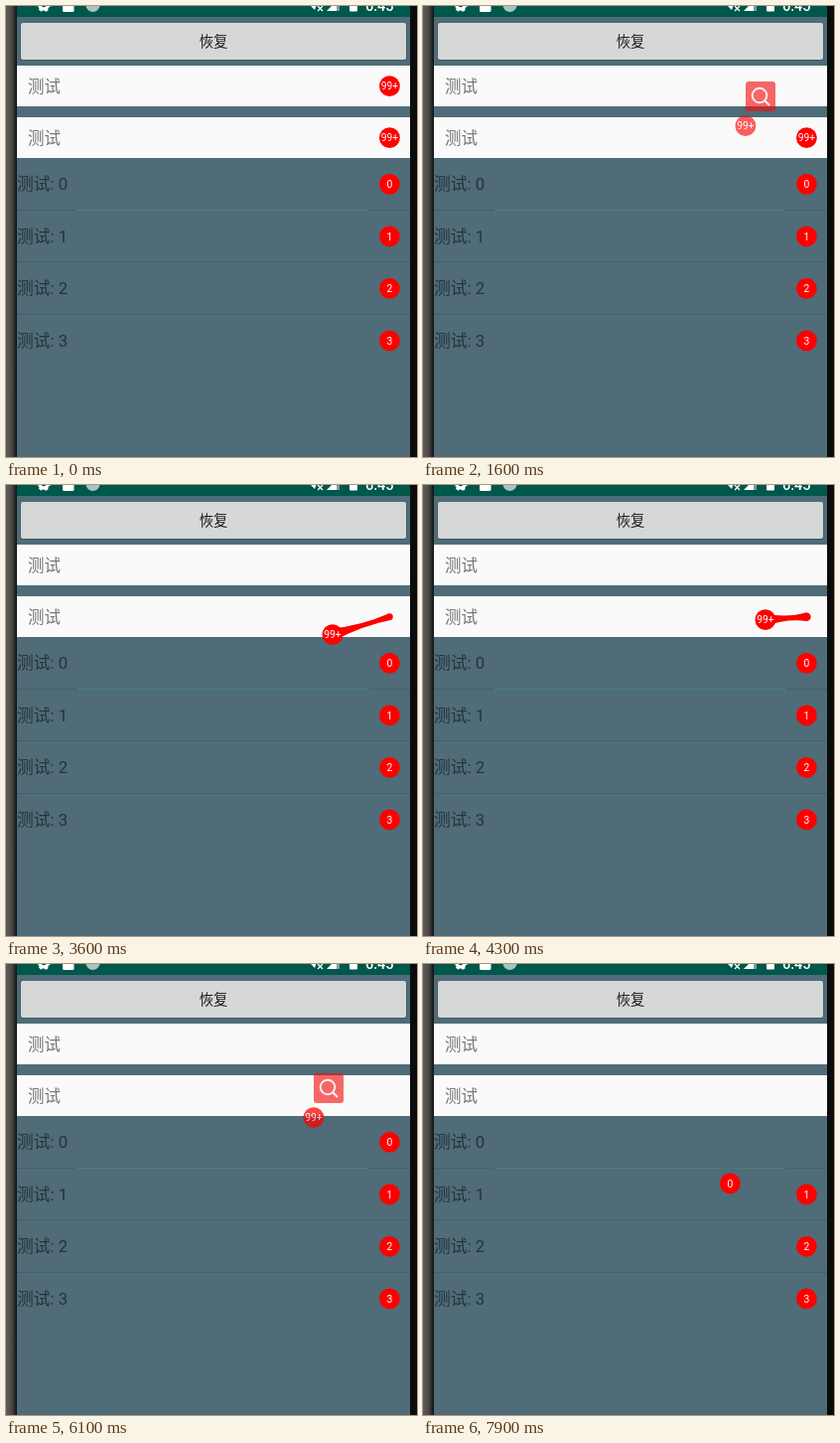
An HTML page for the animation above (8 s loop, 414 by 454 pixels).

```html
<!DOCTYPE html>
<html lang="zh">
<head>
<meta charset="utf-8">
<title>Badge drag</title>
<style>
  html, body { margin: 0; width: 100%; height: 100%; overflow: hidden; background: #4f6c78; }
  svg { display: block; width: 414px; height: 454px; }
  text { font-family: Roboto, "Noto Sans CJK SC", "Noto Sans CJK", sans-serif; }
  .head { font-size: 16.5px; fill: #757575; }
  .item { font-size: 16.8px; fill: #26343b; }
  .num { font-size: 10.3px; fill: #fff; text-anchor: middle; }
</style>
</head>
<body>
<svg viewBox="0 0 414 454">
  <defs>
    <linearGradient id="bezel">
      <stop offset="0" stop-color="#5d5d5a"/>
      <stop offset=".5" stop-color="#4b4b49"/>
      <stop offset="1" stop-color="#111"/>
    </linearGradient>
  </defs>
  <rect width="414" height="454" fill="#4f6c78"/>
  <rect x="11" width="396" height="11" fill="#00574b"/>

  <g fill="#fff">
    <g fill="none" stroke="#fff">
      <circle cx="38" cy="-1" r="4" stroke-width="3.5"/>
      <circle cx="38" cy="-1" r="6" stroke-width="2" stroke-dasharray="3.140" stroke-dashoffset="1.570"/>
    </g>
    <rect x="57" y="-6" width="11.500" height="12" rx="1.500"/>
    <circle cx="87.500" cy="-1" r="7" fill="#a9c4bf"/>
    <path d="M305 -2h8l-2 6z"/>
    <path d="M314 0l5 5M319 0l-5 5" stroke="#fff" stroke-width="1.300"/>
    <path d="M323 5L333 -5V5z"/>
    <path d="M333 -5h3V5h-3z" opacity=".45"/>
    <rect x="346" y="-6" width="8" height="11.500" rx="1"/>
    <text x="362" y="4.500" font-size="14.500" font-weight="500">6:45</text>
  </g>

  <rect x="14.500" y="17" width="389" height="38" rx="2" fill="#40565f"/>
  <rect x="15" y="17" width="388" height="37" rx="2" fill="#d6d7d7"/>
  <text x="209" y="41" font-size="14.300" fill="#1c1c1c" text-anchor="middle">恢复</text>

  <g id="list"></g>
  <rect x="72" y="205" width="293" height="1" fill="#4b8279"/>

  <rect width="11" height="454" fill="url(#bezel)"/>
  <rect x="407" width="7" height="454" fill="#0b0b0b"/>

  <g id="badges"></g>
  <g id="search">
    <rect width="30" height="30" rx="3" fill="#f20d0d" opacity=".62"/>
    <g fill="none" stroke="#fff" stroke-width="1.900" stroke-linecap="round" opacity=".9">
      <circle cx="14" cy="14" r="7.300"/>
      <path d="M19.500 19.500L23.500 23.500"/>
    </g>
  </g>
</svg>
<script>
const LOOP = 8000, STEP = 100;
const HOME_X = 386.4, RADIUS = 10.4, SNAP = 67;
const ICON_LINGER = 300;
const NS = 'http://www.w3.org/2000/svg';
const search = document.getElementById('search');
const list = document.getElementById('list');
const layer = document.getElementById('badges');

function add(parent, tag, attrs, text) {
  const el = document.createElementNS(NS, tag);
  for (const key in attrs) el.setAttribute(key, attrs[key]);
  if (text) el.textContent = text;
  parent.appendChild(el);
  return el;
}

function makeBadge(y, label) {
  const group = add(layer, 'g', {});
  const rope = add(group, 'path', { fill: '#f00' });
  const root = add(group, 'circle', { cx: HOME_X, cy: y, r: 0, fill: '#f00' });
  const head = add(group, 'g', { transform: `translate(${HOME_X} ${y})` });
  add(head, 'circle', { r: RADIUS, fill: '#f00' });
  add(head, 'text', { y: 3.7, class: 'num' }, label);
  return { y, group, rope, root, head };
}

const badges = [];
for (const y of [60, 112]) {
  add(list, 'rect', { x: 11, y, width: 396, height: 41, fill: '#fafafa' });
  add(list, 'text', { x: 22, y: y + 27, class: 'head' }, '测试');
  badges.push(makeBadge(y + 20.7, '99+'));
}
for (let i = 0; i < 4; i++) {
  const y = 179.3 + i * 52.5;
  add(list, 'text', { x: 11, y: y + 5.9, class: 'item' }, '测试: ' + i);
  if (i < 3) add(list, 'rect', { x: 11, y: Math.floor(y + 26), width: 396, height: 1, fill: '#465f69' });
  badges.push(makeBadge(y, String(i)));
}

// Drags: stops of [ms, dx, dy] from the badge's home; fade is [start, end].
const drags = [
  { badge: badges[0], fade: [1300, 2100],
    stops: [[600, 0, 0], [1100, -61.5, 40]] },
  { badge: badges[1], fade: [5800, 6950],
    stops: [[2600, 0, 0], [2800, -36, 26], [3200, -40, 28], [3600, -57.5, 18],
            [4300, -41.5, 3], [4900, 0, -33], [5400, -52.5, 22], [5600, -76.5, 22]] },
  { badge: badges[2], fade: [LOOP, LOOP + 1000],
    stops: [[7400, 0, 0], [7900, -77, 41.5]] }
];

const clamp = v => Math.max(0, Math.min(1, v));
const progress = (t, a, b) => clamp((t - a) / (b - a));
const smooth = k => k * k * (3 - 2 * k);

function offsetAt(stops, t) {
  let dx = 0, dy = 0, from = 0;
  for (const [end, x, y] of stops) {
    const k = smooth(progress(t, from, end));
    dx += (x - dx) * k;
    dy += (y - dy) * k;
    from = end;
  }
  return [dx, dy];
}

function ropePath(x0, y0, r0, x1, y1, r1) {
  const d = Math.hypot(x1 - x0, y1 - y0);
  const nx = (y0 - y1) / d, ny = (x1 - x0) / d;
  const mid = `${(x0 + x1) / 2} ${(y0 + y1) / 2}`;
  const edge = (x, y, r) => `${x + nx * r} ${y + ny * r}`;
  return `M${edge(x0, y0, r0)}Q${mid} ${edge(x1, y1, r1)}` +
         `L${edge(x1, y1, -r1)}Q${mid} ${edge(x0, y0, -r0)}Z`;
}

function draw(t) {
  let iconShown = false;
  for (const { badge, stops, fade: [start, end] } of drags) {
    const [dx, dy] = offsetAt(stops, t);
    const x = HOME_X + dx, y = badge.y + dy;
    const d = Math.hypot(dx, dy);
    const tied = d > 0.5 && d < SNAP;
    const r0 = RADIUS * 0.6 * (1 - d / 130);
    badge.head.setAttribute('transform', `translate(${x} ${y})`);
    badge.root.setAttribute('r', tied ? r0 : 0);
    badge.rope.setAttribute('d', tied ? ropePath(HOME_X, badge.y, r0, x, y, RADIUS * 0.6) : '');
    badge.group.setAttribute('opacity', 1 - progress(t, start, end));
    if (t >= start && t < end + ICON_LINGER) {
      iconShown = true;
      search.setAttribute('transform', `translate(${Math.round(x)} ${Math.round(y - 44.5)})`);
    }
  }
  search.setAttribute('opacity', iconShown ? 1 : 0);
}

const begin = performance.now();
function tick() {
  const t = (performance.now() - begin) % LOOP;
  draw(Math.floor(t / STEP) * STEP);
  requestAnimationFrame(tick);
}
tick();
</script>
</body>
</html>
```
